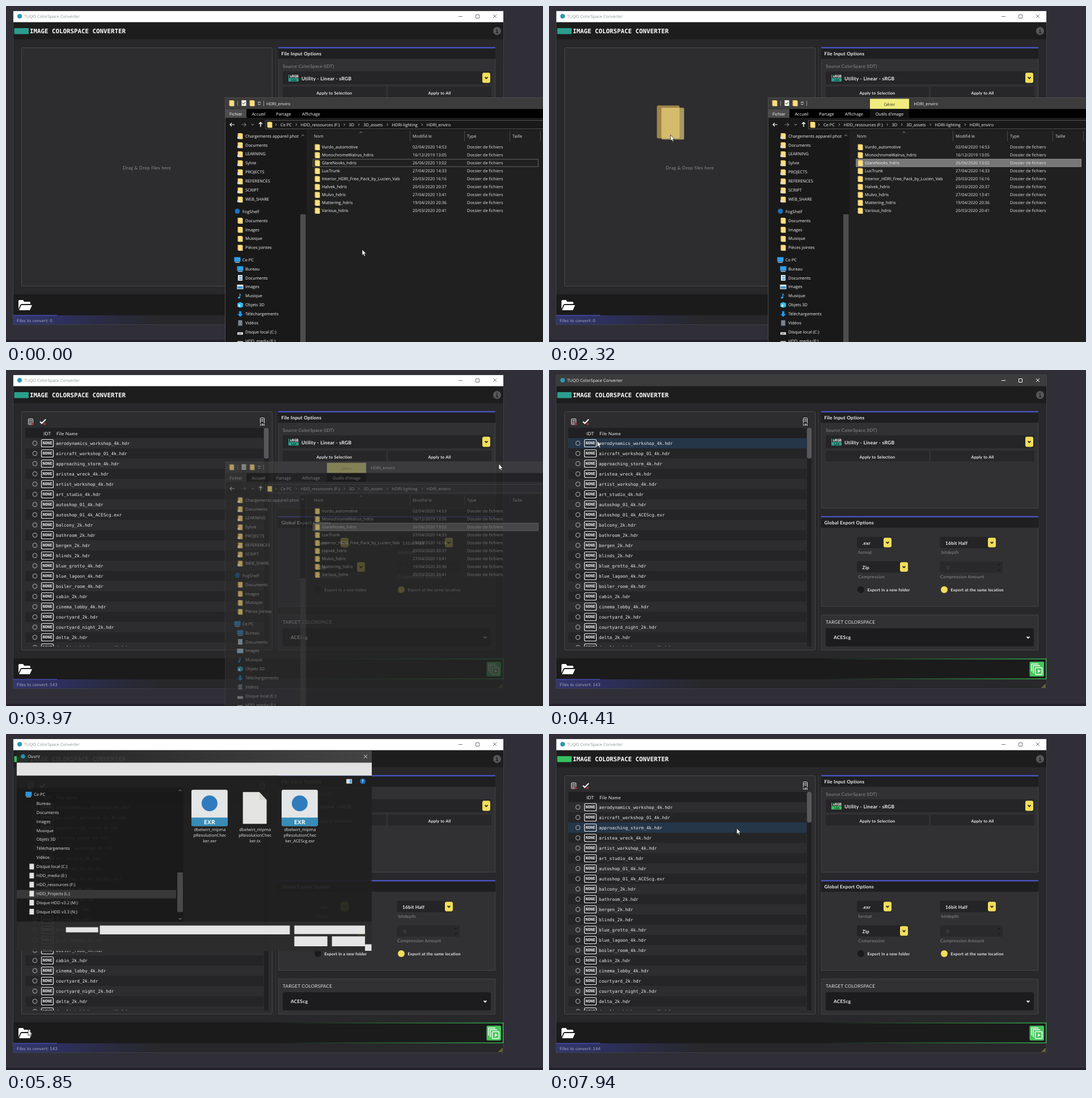
An HTML page with a canvas that plays this animation: 947 px wide and 592 px high, repeating every 8 s.

```html
<!DOCTYPE html>
<html lang="fr">
<head>
<meta charset="utf-8">
<title>Colorspace converter</title>
<style>
html, body { margin: 0; height: 100%; overflow: hidden; background: #302f38; }
canvas { display: block; }
</style>
</head>
<body>
<canvas id="stage" width="947" height="592"></canvas>
<script>
const c = document.getElementById('stage').getContext('2d');
const LOOP = 8000, STEP = 111;
const UI = '7.4px "Open Sans", sans-serif';
const MONO = '7.72px "DejaVu Sans Mono", monospace';
const bold = (size) => `bold ${size}px "DejaVu Sans Mono", monospace`;
const lato = (size, weight = 400) => `${weight} ${size}px Lato, sans-serif`;
const YELLOW = '#f2de5a', BLUE = '#525ee0', GREY = '#8d8d90';

// ---- drawing helpers ----
function rect(x, y, w, h, fill, r = 0) {
  c.fillStyle = fill;
  c.beginPath();
  c.roundRect(x, y, w, h, r);
  c.fill();
}
function box(x, y, w, h, stroke, r = 0, lw = 1) {
  c.strokeStyle = stroke;
  c.lineWidth = lw;
  c.beginPath();
  c.roundRect(x + .5, y + .5, w - 1, h - 1, r);
  c.stroke();
}
function shape(d, x, y, fill, stroke, lw = 1) {
  c.save();
  c.translate(x, y);
  const p = new Path2D(d);
  if (fill) { c.fillStyle = fill; c.fill(p); }
  if (stroke) { c.strokeStyle = stroke; c.lineWidth = lw; c.stroke(p); }
  c.restore();
}
function dot(x, y, r, fill, stroke, lw = 1) {
  c.beginPath();
  c.arc(x, y, r, 0, 7);
  if (fill) { c.fillStyle = fill; c.fill(); }
  if (stroke) { c.strokeStyle = stroke; c.lineWidth = lw; c.stroke(); }
}
function text(s, x, y, color = '#f4f4f4', font = UI, align = 'left') {
  c.font = font;
  c.letterSpacing = font.includes('Lato') ? '.25px' : '0px';
  c.textAlign = align;
  c.fillStyle = color;
  c.fillText(s, x, y + .35 * parseFloat(font.match(/[\d.]+(?=px)/)[0]));
}
function fade(x0, x1, ...stops) {
  const g = c.createLinearGradient(x0, 0, x1, 0);
  stops.forEach((s, i) => g.addColorStop(i / (stops.length - 1), s));
  return g;
}
const chevron = (x, y, color, lw = 1) => shape('M-2.4-1.2L0 1.2L2.4-1.2', x, y, null, color, lw);
const caretUp = (x, y, color) => shape('M-2.4 1.2L0-1.2L2.4 1.2', x, y, null, color);
function drop(x, y, h) {
  rect(x, y, 14, h, YELLOW, 3);
  chevron(x + 7, y + h / 2, '#222', 1.7);
}
function crumbs(names, x, y) {
  for (const [i, name] of ['', ...names].entries()) {
    if (i) {
      text(name, x, y);
      x += c.measureText(name).width + 8;
    }
    if (i < names.length) shape('M-1-2L1 0L-1 2', x, y, null, '#aaa');
    x += 8;
  }
}
function controls(y, color) {
  rect(798, y, 7, 1, color);
  box(828, y - 3, 7, 7, color);
  cross(862, y, color);
}
const cross = (x, y, color) => shape('M-3-3L3 3M3-3L-3 3', x, y, null, color);
function navArrows(x, y) {
  shape('M4 0H-4M-1-3L-4 0L-1 3', x, y, null, '#fff', 1.2);
  shape('M-4 0H4M1-3L4 0L1 3', x + 20, y, null, '#777', 1.2);
  chevron(x + 36, y, '#aaa');
  shape('M0 4V-4M-3-1L0-4L3-1', x + 50, y, null, '#fff', 1.4);
}

const icons = {
  folder(x, y) { rect(x - 4.5, y - 5, 8, 10, '#e9bf55', 1); rect(x - 3, y - 4, 7.5, 9.5, '#fbdf86', .5); },
  pinned(x, y) { icons.folder(x, y); rect(x - 5, y + 1, 4, 4, '#d5dadf', 1); },
  screen(x, y) { rect(x - 5.5, y - 4.5, 11, 8, '#2f9fea'); rect(x - 4, y + 4, 8, 1.3, '#b9cbd8'); },
  doc(x, y) { rect(x - 4, y - 5, 8, 10, '#e6eef5'); rect(x - 2, y - 3, 5, 2, '#4b96d1'); rect(x - 2, y + 1, 5, 2, '#4b96d1'); },
  image(x, y) { rect(x - 5.5, y - 4, 11, 8, '#e3eff7'); rect(x - 4.5, y - 1, 9, 4, '#3f93cf'); },
  note(x, y) { shape('M0-5V3A2 1.6 0 1 1-1.3 1.6V-5C1-2 3-2 2 1Q2-2 0-2Z', x, y, '#35a7ee'); },
  cube(x, y) { shape('M0-5L5-3V3L0 5L-5 3V-3Z', x, y, '#37b9e8'); rect(x - 3, y - 1, 3, 4, '#c9eefa'); },
  down(x, y) { shape('M-2-5H2V0H5L0 5L-5 0H-2Z', x, y, '#1f9af0'); },
  film(x, y) { rect(x - 4, y - 5, 8, 10, '#59616c'); for (let i = -4; i < 5; i += 3) rect(x - 3, y + i, 6, 1, '#c4ccd5'); },
  drive(x, y) { rect(x - 5, y, 10, 4.5, '#dcdcdc', 1); rect(x - 3, y + 2, 5, 1, '#555'); },
  page(x, y) { rect(x - 3.5, y - 5, 8, 10, '#f2f2ee'); }
};
const PC = [['Bureau', 'screen'], ['Documents', 'doc'], ['Images', 'image'], ['Musique', 'note'], ['Objets 3D', 'cube'],
  ['Téléchargements', 'down'], ['Vidéos', 'film'], ['Disque local (C:)', 'drive'], ['HDD_media (E:)', 'drive'],
  ['HDD_ressources (F:)', 'drive'], ['HDD_Projects (L:)', 'drive'], ['Disque HDD v3.2 (M:)', 'drive'], ['Disque HDD v3.3 (N:)', 'drive']];
function tree(items, x, y, raw) {
  items.forEach(([name, kind], i) => {
    const cy = y + i * 15.95;
    if (!raw) icons[kind](x, cy);
    else if (kind == 'drive') icons.page(x, cy);
    text(name, x + 9, cy);
  });
}

// ---- converter window ----
const FILES = ['aerodynamics_workshop_4k.hdr', 'aircraft_workshop_01_4k.hdr', 'approaching_storm_4k.hdr', 'aristea_wreck_4k.hdr',
  'artist_workshop_4k.hdr', 'art_studio_4k.hdr', 'autoshop_01_4k.hdr', 'autoshop_01_4k_ACEScg.exr', 'balcony_2k.hdr', 'bathroom_2k.hdr',
  'bergen_2k.hdr', 'blinds_2k.hdr', 'blue_grotto_4k.hdr', 'blue_lagoon_4k.hdr', 'boiler_room_4k.hdr', 'cabin_2k.hdr',
  'cinema_lobby_4k.hdr', 'courtyard_2k.hdr', 'courtyard_night_2k.hdr', 'delta_2k.hdr', 'derelict_highway_noon_4k.hdr'];

function panel(y, h, title) {
  rect(480, y, 383, h, '#313133');
  box(480, y, 383, h, '#434346');
  if (!title) return;
  rect(480, y, 383, 21, '#1f1f21');
  rect(480, y + .5, 383, 2, BLUE);
  text(title, 485.5, y + 12, '#f2f2f2', lato(8.3, 700));
}
function fileList(hover) {
  box(39, 85.5, 9, 11, '#eee', 1);
  for (let i = 0; i < 3; i++) rect(41, 88 + i * 2.6, 5, 1, '#eee');
  shape('M-5 0L-2 3L5-4', 65, 91, null, '#fff', 2);
  for (const x of [47, 68]) dot(x, 95, 2.3, '#8e3a35');
  box(448, 84, 8, 11, '#eee', 1);
  rect(450, 87, 4, 1, '#eee');
  rect(450, 89.5, 4, 1, '#eee');
  rect(447, 93.5, 10, 5, '#2d2d2f');
  text('LOG', 452, 96, '#fff', bold(4.6), 'center');
  rect(34, 102, 420, 18, '#202022');
  text('IDT', 66, 112, '#eee', lato(8));
  text('File Name', 89, 112, '#eee', lato(8));
  c.save();
  c.beginPath();
  c.rect(34, 102, 430, 385);
  c.clip();
  FILES.forEach((name, i) => {
    const y = 129 + i * 18;
    rect(34, y - 9, 420, 18, i == hover ? '#253649' : i % 2 ? '#252527' : '#2d2d2f');
    dot(51, y, 3.7, null, '#88888b', 1.5);
    box(62, y - 7, 22, 14, '#e8e8e8', 2, 1.2);
    text('NONE', 73, y, '#f4f4f4', bold(7), 'center');
    text(name, 88, y, '#eeeeee', MONO);
  });
  rect(455, 102, 8, 385, '#202022');
  rect(455, 102, 8, 54, '#58585a', 3);
  c.restore();
}
function converter(s) {
  rect(12, 8, 866, 554, '#404043');
  rect(13, 9, 864, 552, '#28282a');
  rect(13, 9, 864, 20, s.active ? '#3c3c3c' : '#fff');
  dot(24, 18, 4, '#2699b4');
  text('TUQO ColorSpace Converter', 32, 18.5, s.active ? '#f2f2f2' : '#8a9795', UI);
  controls(18, s.active ? '#fff' : '#777');
  rect(13, 28.5, 864, 30, '#1d1d1e');
  rect(14.5, 39, 25.5, 10.5, s.accent, 1);
  text('IMAGE COLORSPACE CONVERTER', 42, 44.5, '#fff', bold(10.8));
  dot(866, 44, 7, '#58585a');
  text('i', 866, 44, '#1d1d1e', bold(10), 'center');

  rect(27, 73, 443, 421, '#2d2d2f', 2);
  box(27, 73, 443, 421, '#49494c', 2);
  rect(475, 73, 1, 421, '#39393c');
  if (s.count) fileList(s.hover);
  else text('Drag & Drop files here', 206, 285, '#8b8b91', lato(8.1));

  panel(72, 172, 'File Input Options');
  text('Source ColorSpace (IDT)', 488, 106, GREY, lato(8));
  rect(488, 115, 368, 23, '#252527', 2);
  rect(498, 127, 18, 6, s.accent);
  rect(498, 121, 1.5, 12, s.accent);
  text('sRGB', 500.5, 124, '#fff', bold(6.4));
  text('Lin', 503, 130, '#10201d', bold(5));
  text('Utility - Linear - sRGB', 521, 127.5, '#f0f0f0', lato(8.6, 700));
  drop(840, 117.5, 18);
  rect(488, 142, 182, 19, '#272729');
  rect(673.5, 142, 182.5, 19, '#272729');
  text('Apply to Selection', 579, 153, '#eee', lato(7.2, 700), 'center');
  text('Apply to All', 764.5, 153, '#eee', lato(7.2, 700), 'center');

  panel(257, 160, 'Global Export Options');
  const combo = (label, note, x, y, w) => {
    rect(x, y, w, 20, '#242426', 2);
    drop(x + w - 14, y + 1.5, 17);
    text(label, x + 9.5, y + 11, '#eee', lato(8.2, 700));
    text(note, x + 2.5, y + 27.5, GREY, lato(7.7));
  };
  combo('.exr', 'format', 543, 294, 61);
  combo('Zip', 'Compression', 543, 337, 90);
  combo('16bit Half', 'bitdepth', 689.5, 294, 98.5);
  rect(689.5, 337.5, 97, 19.5, '#29292b', 2);
  rect(787, 337.5, 13, 19.5, '#29292b');
  text('0', 701, 348, '#5c5c60', lato(8));
  caretUp(793, 343, '#111');
  chevron(793, 352, '#111');
  text('Compression Amount', 690, 364.5, GREY, lato(7.7));
  dot(550, 387, 6, '#1a1a1b');
  text('Export in a new folder', 561.5, 387.5, '#eee', lato(7.1, 700));
  dot(697, 387, 6, YELLOW);
  text('Export at the same location', 708.5, 387.5, '#eee', lato(7.1, 700));

  panel(431, 63);
  text('TARGET COLORSPACE', 488, 444, '#e4e4e4', lato(8.05));
  rect(488, 455, 367, 32, '#1c1c1e', 3);
  text('ACEScg', 502, 471.5, '#eee', lato(8.3, 700));
  chevron(845, 471, '#fff', 1.7);

  rect(13, 508, 864, 37, '#1b1b1c');
  shape('M0 16V2Q0 0 2 0H8L10 3H19Q21 3 21 5V7H6Q4 7 3 9ZM5 9H24L20 18H1Z', 22, 518, '#fff');
  const green = fade(480, 877, 'rgba(60,205,85,0)', '#3ccd55');
  rect(480, 508.5, 397, 1.2, green);
  rect(480, 543.5, 397, 1.2, green);
  rect(876, 508.5, 1.2, 36, '#3ccd55');
  rect(847.5, 514, 25.5, 26, '#46c75c', 2);
  shape('M0 13V0H12M3 16V3H15', 851, 518, null, '#fff', 1.4);
  box(857, 524, 13, 13, '#fff', 1, 1.5);
  shape('M0 0V6L5 3Z', 862, 527.5, '#fff');

  rect(13, 545, 864, 16, fade(13, 270, '#33376e', '#2d305c', '#292b40', '#28282b'));
  rect(13, 544.5, 77, 1.3, '#4b53c0');
  text('Files to convert: ' + s.count, 19, 554, '#a9abc0', lato(7.4));
  for (let i = 0; i < 3; i++)
    for (let j = 0; j <= i; j++) rect(874 - j * 2.4, 554 + i * 2.2, 1.3, 1.3, YELLOW);
}

// ---- file explorer ----
const FOLDERS = [['Vurdo_automotive', '02/04/2020 14:53'], ['MonochromeWalrus_hdris', '16/12/2019 13:05'], ['GlareNooks_hdris', '26/06/2020 13:02'],
  ['LuxTrunk', '27/04/2020 14:33'], ['Interior_HDRI_Free_Pack_by_Lucien_Vab', '20/03/2020 16:16'], ['Halvek_hdris', '20/03/2020 20:37'],
  ['Mulvo_hdris', '27/04/2020 13:41'], ['Mattering_hdris', '19/04/2020 20:36'], ['Various_hdris', '20/03/2020 20:41']];
const QUICK = ['Chargements appareil phot', 'Documents', 'LEARNING', 'Sylvie', 'PROJECTS', 'REFERENCES', 'SCRIPT', 'WEB_SHARE'];
const CLOUD = ['Documents', 'Images', 'Musique', 'Pièces jointes'];

function explorer(selected) {
  rect(386, 161, 561, 431, '#4c4c4c');
  rect(387, 162, 560, 20, '#3c3c3c');
  icons.folder(398, 171);
  icons.page(419, 171);
  shape('M-2 0L0 2L3-2', 419, 171, null, '#444');
  icons.folder(434, 171);
  rect(444, 169, 5, 1, '#fff');
  chevron(446.5, 173, '#fff');
  rect(408, 167, 1, 9, '#999');
  rect(454, 167, 1, 9, '#999');
  rect(387, 181.5, 560, 15.5, '#000');
  rect(387, 181.5, 37, 15.5, '#4b4b4b');
  ['Fichier', 'Accueil', 'Partage', 'Affichage'].forEach((s, i) => text(s, [405.5, 445.5, 489.5, 538][i], 190, '#fff', UI, 'center'));
  if (selected) {
    rect(566, 163.5, 69, 18, '#f1ec7d');
    rect(566, 181.5, 69, 15.5, '#111');
    text('Gérer', 600.5, 173, '#333', UI, 'center');
    text("Outils d'image", 600.5, 190, '#fff', UI, 'center');
  }
  text('HDRI_enviro', selected ? 643.5 : 459, 172);

  rect(387, 197, 560, 395, '#191919');
  navArrows(399, 209);
  box(457, 201, 495, 16, '#535353');
  icons.folder(465, 209);
  crumbs(['Ce PC', 'HDD_ressources (F:)', '3D', '3D_assets', 'HDRI-lighting', 'HDRI_enviro'], 476, 209);

  tree(QUICK.map(s => [s, 'pinned']), 413, 229);
  dot(408, 361.5, 4.5, '#1673c0');
  text('FogShelf', 417, 362);
  tree(CLOUD.map(s => [s, 'folder']), 413, 378);
  icons.screen(408, 447);
  text('Ce PC', 417, 447);
  tree(PC.slice(0, 9), 413, 463);
  rect(519, 221, 9.5, 371, '#191919');
  caretUp(523.5, 228, '#aaa');
  rect(519, 367, 9.5, 225, '#4d4d4d');

  rect(530, 219, 417, 373, '#202020');
  caretUp(626, 222.5, '#999');
  for (const x of [712, 808, 888, 942]) rect(x, 220, 1, 18, '#4a4a4a');
  ['Nom', 'Modifié le', 'Type', 'Taille'].forEach((s, i) => text(s, [543, 717, 813, 893][i], 229.5, '#ddd'));
  FOLDERS.forEach(([name, date], i) => {
    const y = 248.5 + i * 14;
    if (i == 2) {
      if (selected) rect(541.5, y - 7, 397.5, 14, '#777');
      box(541, y - 7, 398, 14, selected ? '#8a8a8a' : '#666');
    }
    icons.folder(549, y);
    text(name, 557, y);
    text(date, 717, y, '#e4e4e4');
    text('Dossier de fichiers', 813, y, '#e4e4e4');
  });
}

// ---- open dialog ----
function thumb(x, exr, tail) {
  if (exr) {
    rect(x - 32, 98, 64, 64, '#f3f5f6', 3);
    dot(x, 122, 14, '#2173b9');
    rect(x - 32, 147, 64, 15, '#2a86b5', [0, 0, 3, 3]);
    text('EXR', x, 155, '#fff', 'bold 10.5px "Open Sans", sans-serif', 'center');
  } else {
    shape('M0 0H29L42 14V56H0Z', x - 21, 102, '#f4f4f2');
    shape('M29 0V14H42Z', x - 21, 102, '#d4d4d2');
  }
  ['dbelwirt_mipma', 'pResolutionChec', tail].forEach((s, i) => text(s, x + .5, 168 + i * 10, '#f4f4f4', UI, 'center'));
}
function dialog(raw, alpha, selected) {
  c.save();
  c.globalAlpha = alpha;
  if (raw) {
    c.translate(332, 206);
    c.scale(.997, .997);
    c.translate(-332, -206);
  } else {
    c.shadowColor = 'rgba(0,0,0,.35)';
    c.shadowBlur = 14;
    rect(18, 29, 628, 354, '#202020');
    c.shadowColor = 'transparent';
  }
  rect(18, 29, 628, 21, raw ? fade(18, 646, '#242424', '#474747') : '#3a3a3a');
  rect(18, 50, 628, 23, raw ? '#f2f2f2' : '#191919');
  rect(18, 73, 628, 21, '#202020');
  rect(18, 94, 295, 237, '#191919');
  rect(313, 94, 333, 237, '#202020');
  rect(18, 331, 628, 52, '#2d2d2d');
  if (!raw) box(18, 29, 628, 354, '#4a4a4a');
  dot(29, 39, 3.8, '#2699b4');
  text('Ouvrir', 37.5, 39);
  cross(635, 39, '#eee');

  rect(18, 275, 282, 15, '#3b3b3b');
  icons.screen(39, 106);
  text('Ce PC', 48.5, 106);
  tree(PC, 44, 122, raw);
  rect(302, 244, 10, 70, '#4d4d4d');
  caretUp(307, 99, '#aaa');
  chevron(307, 326, '#aaa');

  if (selected) {
    rect(325, 97, 69, 97, '#757575');
    box(325, 97, 69, 97, '#8c8c8c');
  }
  thumb(359, true, 'ker.exr');
  thumb(439, false, 'ker.tx');
  thumb(518.5, true, 'ker_ACEScg.exr');
  rect(601, 79, 10, 8, '#e8eef2');
  rect(607, 80, 3, 6, '#3c9bd2');
  dot(630, 83, 5, '#1b6fc0');
  text('?', 630, 83, '#fff', bold(7.5), 'center');

  if (raw) {
    rect(105, 341, 57, 9, '#f4f4f4');
    rect(165, 338, 336, 15.5, '#f4f4f4');
    rect(509, 338, 125, 15, '#f4f4f4');
    rect(509, 357, 58.5, 17.5, '#f4f4f4');
    rect(575.5, 357, 58.5, 17.5, '#f4f4f4');
    rect(634, 371, 11.5, 11.5, '#f4f4f4');
  } else {
    rect(38, 329.5, 6, 1.5, '#ccc');
    navArrows(30, 61);
    box(88, 53, 407, 15, '#535353');
    icons.folder(96, 60.5);
    crumbs(['Ce PC', 'HDD_Projects (L:)', 'SCRIPT', 'Colour', 'OCIO_converter', 'tests', 'mipmap'], 107, 61);
    chevron(475, 61, '#aaa');
    dot(489, 61, 2.8, null, '#ccc');
    box(503, 53, 135, 15, '#535353');
    text('Rechercher dans : mipmap', 509, 61, '#8c8c8c');
    dot(629.5, 60, 2.2, null, '#ccc');
    shape('M0 0L-3 3', 628, 61.5, null, '#ccc');
    text('Organiser', 30, 83);
    shape('M-2.5-1H2.5L0 1.5Z', 70, 83, '#ddd');
    text('Nouveau dossier', 93, 83);
    icons.image(570, 83);
    shape('M-2.5-1H2.5L0 1.5Z', 584, 83, '#ddd');
    text('Nom du fichier :', 161, 346, '#f4f4f4', UI, 'right');
    box(165, 338, 337, 16, '#a0a0a0');
    if (selected) text('dbelwirt_mipmapResolutionChecker.exr', 167, 346.5);
    chevron(495, 346, '#aaa');
    box(509, 338, 125.5, 16, '#8a8a8a');
    text('Images (*.png *.exr *.jpg *.hdr *', 511.5, 346.5);
    chevron(628, 346, '#aaa');
    box(509, 357, 59, 18, '#f2f2f2', 0, 1.3);
    box(575.5, 357, 59, 18, '#e0e0e0');
    text('Ouvrir', 538.5, 366, '#f4f4f4', UI, 'center');
    text('Annuler', 605, 366, '#f4f4f4', UI, 'center');
    for (let i = 0; i < 3; i++)
      for (let j = 0; j <= i; j++) rect(643 - j * 2.2, 377 + i * 2.2, 1, 1, '#aaa');
  }
  c.restore();
}

// ---- pointer: start time, moves, destination ----
const TRACK = [[440, 8, 608, 277], [1550, 6, 295, 242], [2220, 3, 186, 222], [2760, 5, 768, 150], [3330, 1, 960, 170],
  [3970, 5, 85, 125], [4520, 3, 34, 540], [4850, 4, 39, 521], [5970, 6, 400, 240], [6610, 5, 366, 118], [7600, 4, 331, 166]];
function pointer(t) {
  let x = 628, y = 429;
  for (const [start, n, toX, toY] of TRACK) {
    if (t < start) break;
    const p = Math.min(1, (Math.floor((t - start) / STEP + .15) + 1) / n);
    const e = p * p * (3 - 2 * p);
    x += (toX - x) * e;
    y += (toY - y) * e;
  }
  return [x, y];
}

function draw(t) {
  const [x, y] = pointer(t);
  const exploring = t < 4080, asking = t >= 5750 && t < 7390;
  const overList = x > 34 && x < 454 && y >= 120 && y < 487 && !asking && !(exploring && x > 386 && y > 161);
  rect(0, 0, 947, 592, '#302f38');
  rect(0, 588, 947, 4, '#232129');
  converter({
    active: t >= 4080 && t < 5410,
    accent: t < 5410 ? '#2a9f8c' : '#36bf60',
    count: t < 2760 ? 0 : t < 7390 ? 143 : 144,
    hover: overList ? Math.floor((y - 120) / 18) : -1
  });
  if (exploring) {
    c.globalAlpha = t < 3970 ? 1 : .4;
    explorer(t >= 1109);
    c.globalAlpha = 1;
  }
  if (asking) {
    const opening = t < 5970;
    dialog(opening, t < 5850 ? .4 : opening ? .93 : t < 7280 ? 1 : .5, t >= 7060);
  }
  // folder carried by the pointer
  if (t >= 1550 && t < 2650) {
    c.globalAlpha = .6;
    rect(x - 24, y - 52, 40, 58, '#e9bf55', 3);
    rect(x - 16, y - 48, 40, 56, '#fbdf86', 2);
    c.globalAlpha = 1;
  }
  shape('M0 0V10.5L2.4 8.3L4 12L5.8 11.2L4.2 7.6H7.3Z', x, y, '#fff', '#111', .7);
}

c.textRendering = 'geometricPrecision';
const begin = performance.now();
function tick(now) {
  draw(Math.max(0, now - begin) % LOOP);
  requestAnimationFrame(tick);
}
tick(begin);
</script>
</body>
</html>
```
